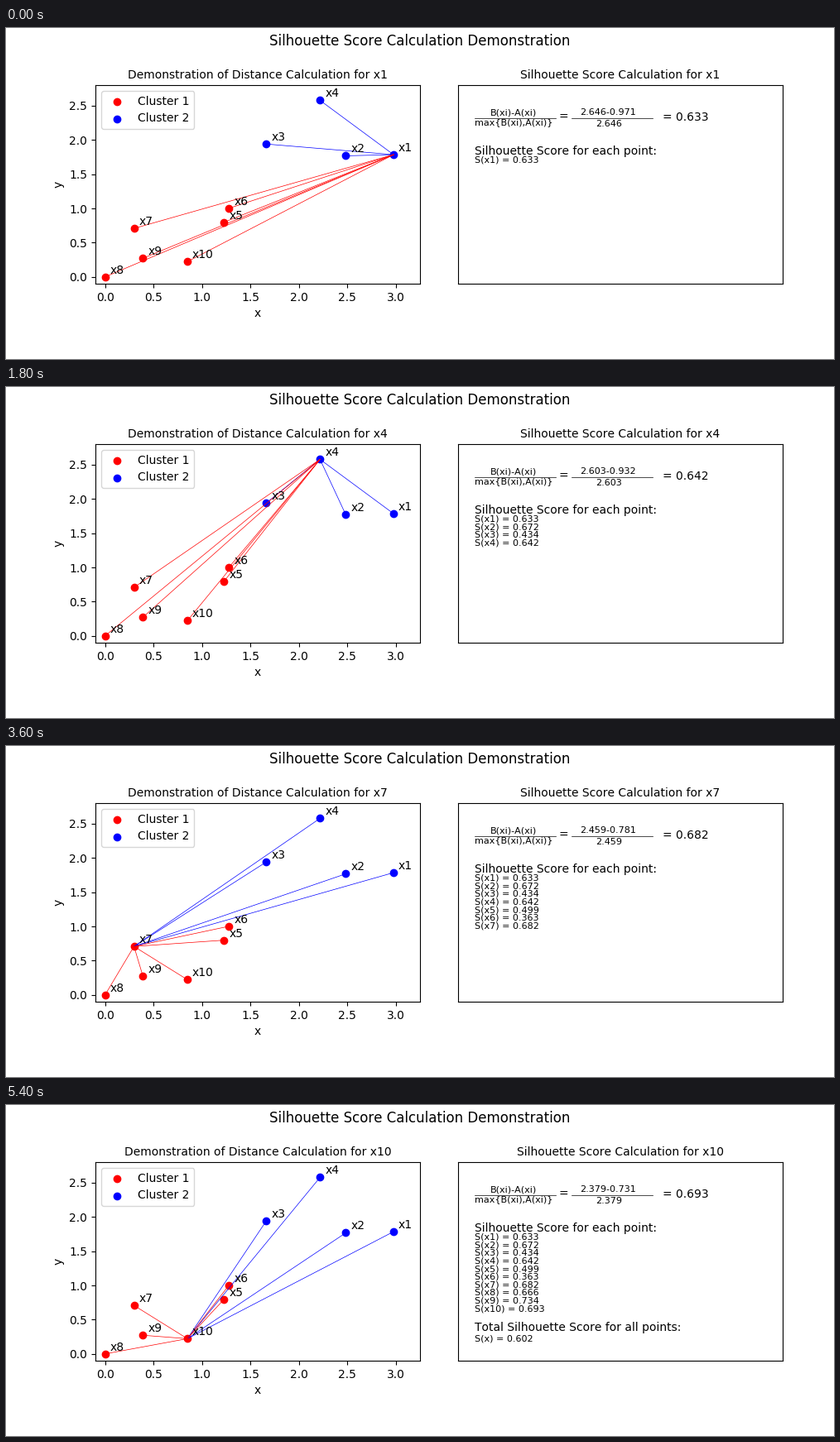
Animation of 1000x400 px, one loop 6 s. Source, as a matplotlib script:

```python
import matplotlib.pyplot as plt
import numpy as np
from matplotlib.animation import FuncAnimation

# Whole-pixel kerning gives the slightly wider letter spacing.
plt.rcParams.update({"font.family": "DejaVu Sans", "text.kerning_factor": 6})

W, H = 1000, 400
POINTS = np.array([
    (2.9775, 1.785), (2.485, 1.768), (1.663, 1.940), (2.2185, 2.5775),
    (1.229, 0.799), (1.2785, 1.002), (0.2984, 0.7075), (0, 0),
    (0.391, 0.272), (0.8496, 0.2224),
])
N = len(POINTS)
IS_BLUE = np.arange(N) < 4


def silhouette(k):
    """Mean distance to the own cluster, to the other one, and the score."""
    dist = np.hypot(*(POINTS - POINTS[k]).T)
    own = IS_BLUE == IS_BLUE[k]
    a = dist[own].sum() / (own.sum() - 1)
    b = dist[~own].mean()
    return a, b, (b - a) / max(a, b)


def fmt(value):
    return str(round(float(value), 3))


def add_axes(left, bottom=309.05):
    return fig.add_axes([left / W, 1 - bottom / H, 392 / W, 240 / H])


STATS = [silhouette(k) for k in range(N)]

fig = plt.figure(figsize=(W / 100, H / 100), dpi=100, facecolor="white")
fig.suptitle("Silhouette Score Calculation Demonstration",
             fontsize=12, y=0.9825)
plot_ax, calc_ax = add_axes(107.95), add_axes(545.95)

# Left panel: points, labels and distance lines
plot_ax.scatter(*POINTS[~IS_BLUE].T, color="red", label="Cluster 1")
plot_ax.scatter(*POINTS[IS_BLUE].T, color="blue", label="Cluster 2")
for i, (x, y) in enumerate(POINTS):
    plot_ax.text(x + 0.05, y + 0.05, f"x{i + 1}", fontsize=10)
rays = [plot_ax.plot([], [], color="blue" if blue else "red", lw=0.5)[0]
        for blue in IS_BLUE]
plot_ax.set(xlim=(-0.1, 3.25), ylim=(-0.1, 2.8), xlabel="x", ylabel="y",
            xticks=np.arange(0, 3.1, 0.5), yticks=np.arange(0, 2.6, 0.5))
plot_ax.legend(loc="upper left")
plot_title = plot_ax.set_title("", fontsize=10)

# Right panel: formula and list of scores
calc_ax.set(xlim=(0, 1), ylim=(0, 1), xticks=[], yticks=[])
calc_title = calc_ax.set_title("", fontsize=10)


def write(x, y, text="", size=8):
    return calc_ax.text(x, y, text, fontsize=size)


write(0.1, 0.85, "B(xi)-A(xi)")
write(0.05, 0.8, "max{B(xi),A(xi)}")
write(0.31, 0.82, "=", 10)
for left in (0.05, 0.35):
    calc_ax.plot([left, left + 0.25], [0.835, 0.835], color="black", lw=0.5)
numerator = write(0.375, 0.85)
denominator = write(0.425, 0.79)
result = write(0.63, 0.82, size=10)

write(0.05, 0.65, "Silhouette Score for each point:", 10)
rows = [write(0.05, 0.61 - 0.04 * i, f"S(x{i + 1}) = {fmt(score)}")
        for i, (_, _, score) in enumerate(STATS)]
total = np.mean([score for _, _, score in STATS])
totals = [write(0.05, 0.15, "Total Silhouette Score for all points:", 10),
          write(0.05, 0.1, f"S(x) = {fmt(total)}")]


def update(k):
    plot_title.set_text(f"Demonstration of Distance Calculation for x{k + 1}")
    calc_title.set_text(f"Silhouette Score Calculation for x{k + 1}")
    for i, ray in enumerate(rays):
        ray.set_data(*POINTS[[k, i]].T)
        ray.set_visible(i != k)

    a, b, score = STATS[k]
    numerator.set_text(f"{fmt(b)}-{fmt(a)}")
    denominator.set_text(fmt(max(a, b)))
    result.set_text(f"= {fmt(score)}")
    for i, row in enumerate(rows):
        row.set_visible(i <= k)
    for text in totals:
        text.set_visible(k == N - 1)


anim = FuncAnimation(fig, update, frames=N, interval=600,
                     init_func=lambda: update(0), repeat=True,
                     repeat_delay=0, blit=False)
plt.show()
```
